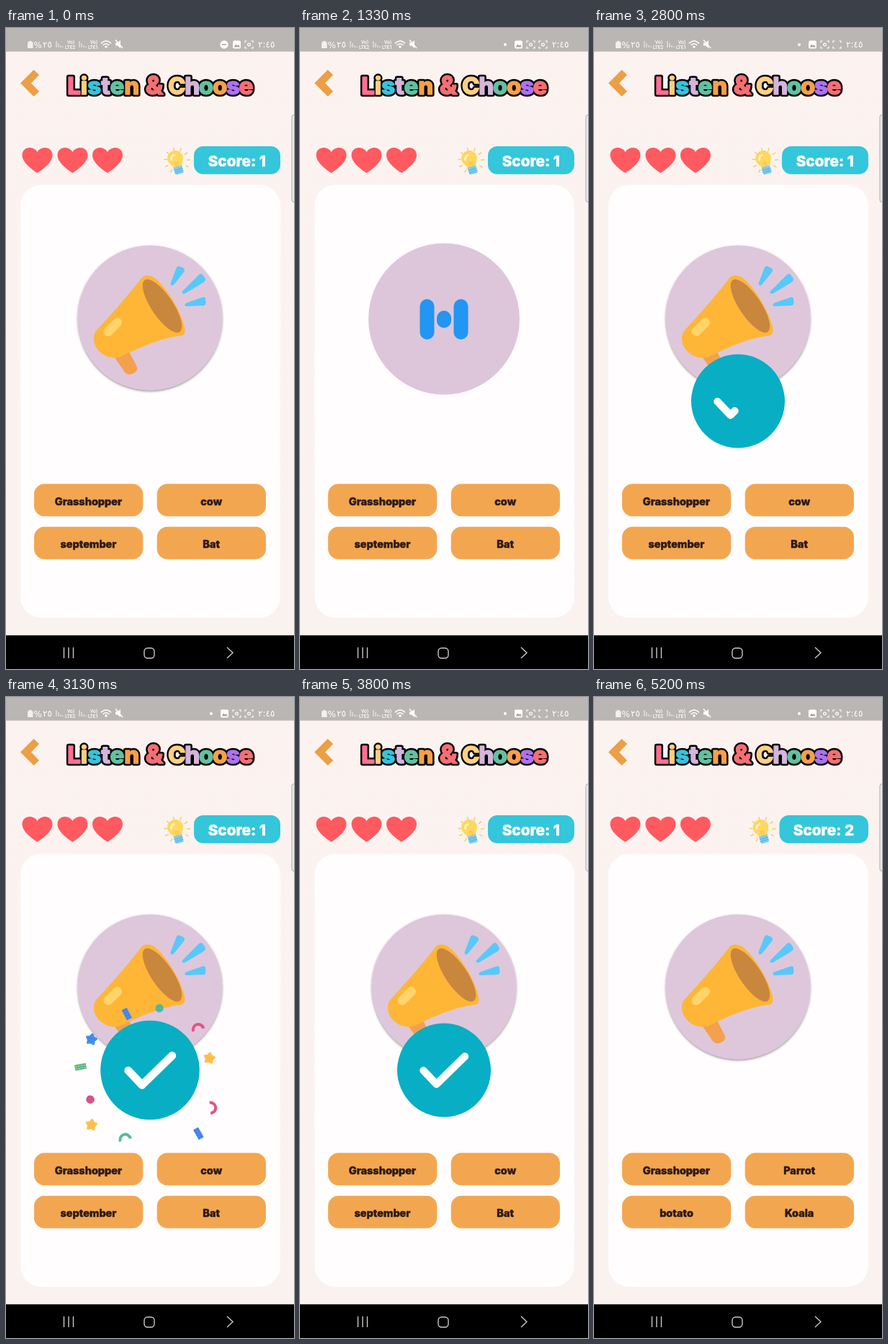
Animation, 400 px wide and 889 px high, one loop 5.34 s. Source, as an HTML page:

```html
<!DOCTYPE html>
<html lang="en">
<head>
<meta charset="utf-8">
<title>Listen &amp; Choose</title>
<style>
  html, body { margin: 0; width: 100%; height: 100%; overflow: hidden; background: #fbf2ef; }
  svg { display: block; width: 100%; height: 100%; }
  text { font-family: Inter, "Open Sans", sans-serif; font-weight: 800; text-anchor: middle; }
  .title text { stroke-linejoin: round; }
  .title .outline { fill: #000; stroke: #000; stroke-width: 6.5px; }
  .title .tint tspan { stroke-width: 1.5px; }
  .word { font-size: 14.5px; fill: #2b1a16; stroke: #2b1a16; stroke-width: .5px; stroke-linejoin: round; }
  .status text { font: 500 6.5px Roboto, "DejaVu Sans", sans-serif; text-anchor: start; fill: #fff; }
  .status .digits { font: 12px "DejaVu Sans", sans-serif; }
</style>
</head>
<body>
<svg id="stage" viewBox="0 0 400 889" preserveAspectRatio="none">
  <defs>
    <linearGradient id="page" x2="0" y2="1">
      <stop stop-color="#fcf3f0"/><stop offset="1" stop-color="#faf2ef"/>
    </linearGradient>
    <filter id="shadow" x="-10%" y="-10%" width="120%" height="120%">
      <feDropShadow dx="0" dy="1.5" stdDeviation="1.5" flood-color="#544a52" flood-opacity=".6"/>
    </filter>
    <path id="heart" fill="#ff5a60" d="M0 17.5C-4 15-21 4-21-7C-21-14-16-17.5-11-17.5C-6-17.5-2-15 0-11.5C2-15 6-17.5 11-17.5C16-17.5 21-14 21-7C21 4 4 15 0 17.5Z"/>
    <path id="frame" fill="none" stroke="#fff" stroke-width="1.2" d="M-5.5-2.5V-5H-3M3-5H5.5V-2.5M5.5 2.5V5H3M-3 5H-5.5V2.5"/>
    <path id="bars" fill="none" stroke="#fff" stroke-opacity=".7" stroke-width="1.2" d="M0 0V-9M3 0V-6M6 0V-3M9 0V-1.5"/>
  </defs>

  <rect width="400" height="889" fill="url(#page)"/>
  <rect width="400" height="32.7" fill="#bab6b4"/>

  <g class="status">
    <path d="M30 19.5h2v-1.5h3.5v1.5h2V28h-7.5z" fill="#fff" opacity=".8"/>
    <text class="digits" x="38.5" y="27.5">%</text>
    <text class="digits" x="51" y="27">٢٥</text>
    <use href="#bars" x="70" y="27"/>
    <text x="85" y="21.5">Vo)</text><text x="82" y="28.5">LTE2</text>
    <use href="#bars" x="102" y="27"/>
    <text x="117" y="21.5">Vo)</text><text x="114" y="28.5">LTE1</text>
    <g fill="none" stroke="#fff" stroke-width="1.5">
      <path d="M132 21.5Q139 14.5 146 21.5M134.5 24Q139 19.5 143.5 24"/>
      <path d="M152 16.5L162 28"/>
    </g>
    <circle cx="139" cy="26" r="1.8" fill="#fff"/>
    <path d="M152 20.5h3l4-3.5v11l-4-3.5h-3z" fill="#fff"/>
    <g id="icons">
      <circle id="dnd" cy="23" fill="#fff"/>
      <path id="minus" d="M300 23h6" stroke="#aaa5a3" stroke-width="1.6"/>
      <rect x="315" y="17.5" width="11" height="11" rx="2" fill="#fff"/>
      <path d="M316.5 26.5l2.7-4 2 2 1.5-1.5 2.3 3.5z" fill="#aaa5a3"/>
      <use href="#frame" x="337.5" y="23"/>
      <circle cx="337.5" cy="23" r="1.9" fill="none" stroke="#fff" stroke-width="1.2"/>
    </g>
    <g id="record">
      <use href="#frame" x="337.5" y="23"/>
      <circle id="lens" cx="337.5" cy="23" r="1.9" fill="none" stroke="#fff" stroke-width="1.2"/>
    </g>
    <text class="digits" x="350" y="27">٢:٤٥</text>
  </g>

  <path d="M38.5 58L46 65L35 76.500L46 88L38.500 95L20 76.500Z" fill="#ec9f45"/>
  <g class="title" id="title"></g>

  <use href="#heart" x="43.5" y="183.5"/>
  <use href="#heart" x="92.5" y="183.5"/>
  <use href="#heart" x="141" y="183.5"/>

  <g id="bulb">
    <g id="rays" stroke="#f9c95c" stroke-width="1.4" stroke-linecap="round"></g>
    <g transform="rotate(-16 236 184)">
      <path d="M230 194Q230 190 227 187A11 11 0 1 1 245 187Q242 190 242 194Z" fill="#fdd75f"/>
      <path d="M230 181a6.500 6.500 0 0 1 5.500-5" fill="none" stroke="#fff1b5" stroke-width="3" stroke-linecap="round"/>
      <path d="M234.500 193v-7l1.500 1.500 1.500-1.500v7" fill="none" stroke="#f3bb48" stroke-width=".8"/>
      <path d="M230 192.500h12v8.500q0 2-2 2h-8q-2 0-2-2z" fill="#7accf5"/>
      <path d="M230 196.500h12M230 199.500h12" stroke="#55aee4" stroke-width=".9"/>
    </g>
  </g>
  <rect id="pill" y="164" height="38.7" rx="13" fill="#34c6da"/>
  <text id="score" y="192" font-size="20.7" fill="#fff" stroke="#fff" stroke-width=".5"></text>

  <rect x="20" y="217.5" width="361" height="600.5" rx="29" fill="#fffdfe"/>
  <rect x="397" y="120.5" width="8" height="121" rx="3" fill="#eeeaea" stroke="#aaa7a8"/>

  <g id="horn">
    <circle cx="200" cy="402" r="100.500" fill="#dec7db" filter="url(#shadow)"/>
    <path d="M151 457L170 447L181 468Q185 475 177 479Q169 483 164 476Z" fill="#f2a14e"/>
    <path d="M188 347C192 342 200 342 207 347C224 361 245 396 248.500 418C249 425 246 427 240 427C212 431 184 444 159 456C142 462 122 448 122 431C122 424 124 421 128 417C148 395 168 373 188 347Z" fill="#ffb636"/>
    <ellipse cx="217" cy="385.500" rx="43.500" ry="15" transform="rotate(56 217 385.500)" fill="#c9863d"/>
    <path d="M142 421L154.500 408.500" stroke="#ffd469" stroke-width="13" stroke-linecap="round"/>
    <g fill="#58c8fa">
      <path d="M228.500 354L237 332Q239 329 242 331L246.500 333Q249 335 247.500 338L233 356Q229 359 228.500 354Z"/>
      <path d="M245 365L268 342Q271 340 273 342L276.500 347Q278 351 274 353L249 368Q243 370 245 365Z"/>
      <path d="M250 381.500L273 373.500Q277 372.500 277 376L277.500 381Q277 385 274 385L251 386Q246 385 250 381.500Z"/>
    </g>
  </g>

  <g id="loader">
    <circle cx="200" cy="403.5" r="105" fill="#dec6da"/>
    <g id="pulse" fill="#2196f3"></g>
  </g>

  <g id="buttons"></g>
  <g id="confetti"></g>

  <g id="check">
    <circle r="65" fill="#08aec4"/>
    <path id="tick" d="M-28.5 .5L-10.5 19.5L29 -19" pathLength="1" fill="none" stroke="#fff" stroke-width="10.5" stroke-linecap="round" stroke-linejoin="round"/>
  </g>

  <rect y="842.3" width="400" height="47" fill="#000"/>
  <g fill="none" stroke="#c9c9c9" stroke-width="1.4">
    <path d="M80.5 859V874M87 859V874M93.5 859V874M307 859L315 866.5L307 874"/>
    <rect x="192" y="860" width="14" height="14" rx="4.5"/>
  </g>
</svg>
<script>
const LOOP = 5340, STEP = 200 / 3;
const NEXT_AT = 4460;
const $ = id => document.getElementById(id);
const show = (id, on) => $(id).setAttribute("display", on ? "inline" : "none");
const set = (el, attrs) => { for (const k in attrs) el.setAttribute(k, attrs[k]); };
const clamp = v => Math.min(1, Math.max(0, v));
const span = (t, a, b) => clamp((t - a) / (b - a));

// Value at time t along [time, value] stops, eased between them.
function track(t, stops) {
  if (t <= stops[0][0]) return stops[0][1];
  for (let i = 1; i < stops.length; i++) {
    const [a, from] = stops[i - 1], [b, to] = stops[i];
    if (t <= b) {
      const u = (t - a) / (b - a);
      return from + (to - from) * u * u * (3 - 2 * u);
    }
  }
  return stops[stops.length - 1][1];
}

// Title: word, centre, size, letter gap, colours
const pink = "#ff6f94", orange = "#f7a04a", cyan = "#38c3dc", lilac = "#d4b5dc",
      green = "#62c1a0", coral = "#f56f73", peach = "#ffcf82", violet = "#ad72f2";
const titleParts = [
  ["Listen", 135.2, 33, 0, [pink, peach, cyan, lilac, green, orange]],
  ["&", 206, 36, 0, [coral]],
  ["Choose", 283.5, 33, -1.4, [peach, lilac, green, orange, violet, coral]]
];
const escapeAmp = s => s.replace("&", "&amp;");
const titleLayer = (cls, paint) => titleParts.map(([word, x, size, gap, hues]) =>
  `<text class="${cls}" x="${x}" y="91.5" font-size="${size}" letter-spacing="${gap}">${paint(word, hues)}</text>`).join("");
$("title").innerHTML =
  titleLayer("outline", escapeAmp) +
  titleLayer("tint", (word, hues) => [...word].map((c, i) =>
    `<tspan fill="${hues[i]}" stroke="${hues[i]}">${escapeAmp(c)}</tspan>`).join(""));

// Light rays around the bulb
$("rays").innerHTML = Array.from({ length: 9 }, (_, i) => {
  const a = (i * 34 + 118) * Math.PI / 180;
  const p = r => `${237.5 + r * Math.cos(a)} ${184 + r * Math.sin(a)}`;
  return `<path d="M${p(14)}L${p(18)}"/>`;
}).join("");

// Answers
const rounds = [
  ["Grasshopper", "cow", "september", "Bat"],
  ["Grasshopper", "Parrot", "botato", "Koala"]
];
$("buttons").innerHTML = rounds[0].map((_, i) => {
  const x = 39 + (i % 2) * 170.7, y = 632.3 + (i >> 1) * 59.5;
  return `<rect x="${x}" y="${y}" width="151.3" height="45" rx="14.5" fill="#f3a650"/>
    <text class="word" x="${x + 75.5}" y="${y + 29.2}"></text>`;
}).join("");
const words = [...document.querySelectorAll(".word")];

// Loader bars
$("pulse").innerHTML = '<rect width="20" rx="10"/>'.repeat(3);
const pulseBars = [...$("pulse").children];

// Confetti: kind, place at full spread, turn, colour, accent
const starPath = "M" + Array.from({ length: 10 }, (_, i) => {
  const a = i * Math.PI / 5 - Math.PI / 2, r = i % 2 ? 4.2 : 7;
  return `${(r * Math.cos(a)).toFixed(1)} ${(r * Math.sin(a)).toFixed(1)}`;
}).join("L") + "Z";
const shapes = {
  strip: (c, d) => `<rect x="-8" y="-4" width="16" height="8" rx="1" fill="${c}"/>
    <path d="M-7-1.5H7M-7 2H7" stroke="${d}" stroke-width="1.4" stroke-dasharray="2 2"/>`,
  dot: (c, d) => `<circle r="5.8" fill="${c}"/>
    <path d="M-4-2H4M-4 2H4" stroke="${d}" stroke-width="1.5" stroke-dasharray="1.5 1.5"/>`,
  arc: c => `<path d="M-7 4A7.3 7.3 0 1 1 7 0" fill="none" stroke="${c}" stroke-width="4"/>`,
  star: (c, d) => `<path d="${starPath}" fill="${c}" stroke="${c}" stroke-width="3" stroke-linejoin="round"/>
    <path d="M-4-1H4M-3 3H3" stroke="${d}" stroke-width="1.4" stroke-dasharray="1.5 2"/>`
};
const blue = "#4192ee", purple = "#7a52cf", rose = "#e35383", gold = "#ffc04d", mint = "#54bd9b";
const bits = [
  ["strip", 168, 440, 62, blue, purple],
  ["dot", 213, 432, 0, mint, blue],
  ["arc", 267, 460, 0, rose],
  ["star", 282, 501, 10, gold, "#ffae3c"],
  ["arc", 285, 570, 100, rose],
  ["strip", 267, 605, 60, blue, purple],
  ["arc", 166, 612, 0, mint],
  ["star", 119, 593, 8, gold, "#ffae3c"],
  ["dot", 117.5, 558, 30, rose, purple],
  ["strip", 104, 513, -10, mint, "#b8c85e"],
  ["star", 119, 475, 12, blue, purple]
];
$("confetti").innerHTML = bits.map(b => `<g>${shapes[b[0]](b[4], b[5])}</g>`).join("");
const bitNodes = [...$("confetti").children];

function drawStatus(t) {
  const slide = span(t, 60, 330);
  $("icons").setAttribute("transform", `translate(${-17 * slide} 0)`);
  set($("dnd"), { cx: 303 - slide, r: 5.7 - 3.7 * slide });
  $("minus").setAttribute("opacity", 1 - span(slide, 0, 0.5));
  $("record").setAttribute("opacity", slide);
  show("lens", t < 525 || (t - 525) % 985 >= 530);
}

function drawLoader(t) {
  const on = t >= 860 && t < 2060;
  show("loader", on);
  show("horn", !on);
  const swing = 16 * Math.cos((t - 1333) * 2 * Math.PI / 1000);
  pulseBars.forEach((bar, i) => {
    const h = i === 1 ? 40 - swing : 40 + swing;
    set(bar, { x: 166.5 + i * 23.5, y: 404 - h / 2, height: h });
  });
}

function drawResult(t) {
  const on = t > 2530 && t < NEXT_AT;
  show("check", on);
  const size = track(t, [[2530, 0], [2735, 1], [2930, 1], [3130, 1.058], [3330, 1]]);
  $("check").setAttribute("transform", `translate(200 517.5) scale(${size})`);
  const drawn = span(t, 2700, 2935);
  $("tick").style.strokeDasharray = `${drawn} 2`;
  show("tick", drawn > 0);

  const u = span(t, 2860, 3500);
  show("confetti", u > 0 && u < 1);
  const spread = (1 - (1 - u) ** 2.2) / 0.703;
  const scale = 1 - span(u, 0.6, 1);
  bits.forEach(([, x, y, turn], i) => {
    const px = 200 + (x - 200) * spread, py = 517.5 + (y - 517.5) * spread;
    const spin = turn + (t - 3133) * (i % 2 ? 0.12 : -0.12);
    bitNodes[i].setAttribute("transform", `translate(${px} ${py}) rotate(${spin}) scale(${scale})`);
  });
}

function drawRound(t) {
  const next = t >= NEXT_AT ? 1 : 0;
  words.forEach((el, i) => { el.textContent = rounds[next][i]; });
  $("score").textContent = `Score: ${next + 1}`;
  $("score").setAttribute("x", 320.8 - 1.8 * next);
  set($("pill"), { x: 261 - 3.5 * next, width: 120 + 3.5 * next });
  $("bulb").setAttribute("transform", `translate(${-3.5 * next} 0)`);
}

function render(now) {
  const t = Math.floor((now % LOOP + 5) / STEP) * STEP;
  drawStatus(t);
  drawLoader(t);
  drawResult(t);
  drawRound(t);
}

const start = performance.now();
function tick(now) {
  render(Math.max(0, now - start));
  requestAnimationFrame(tick);
}
render(0);
requestAnimationFrame(tick);
</script>
</body>
</html>
```
